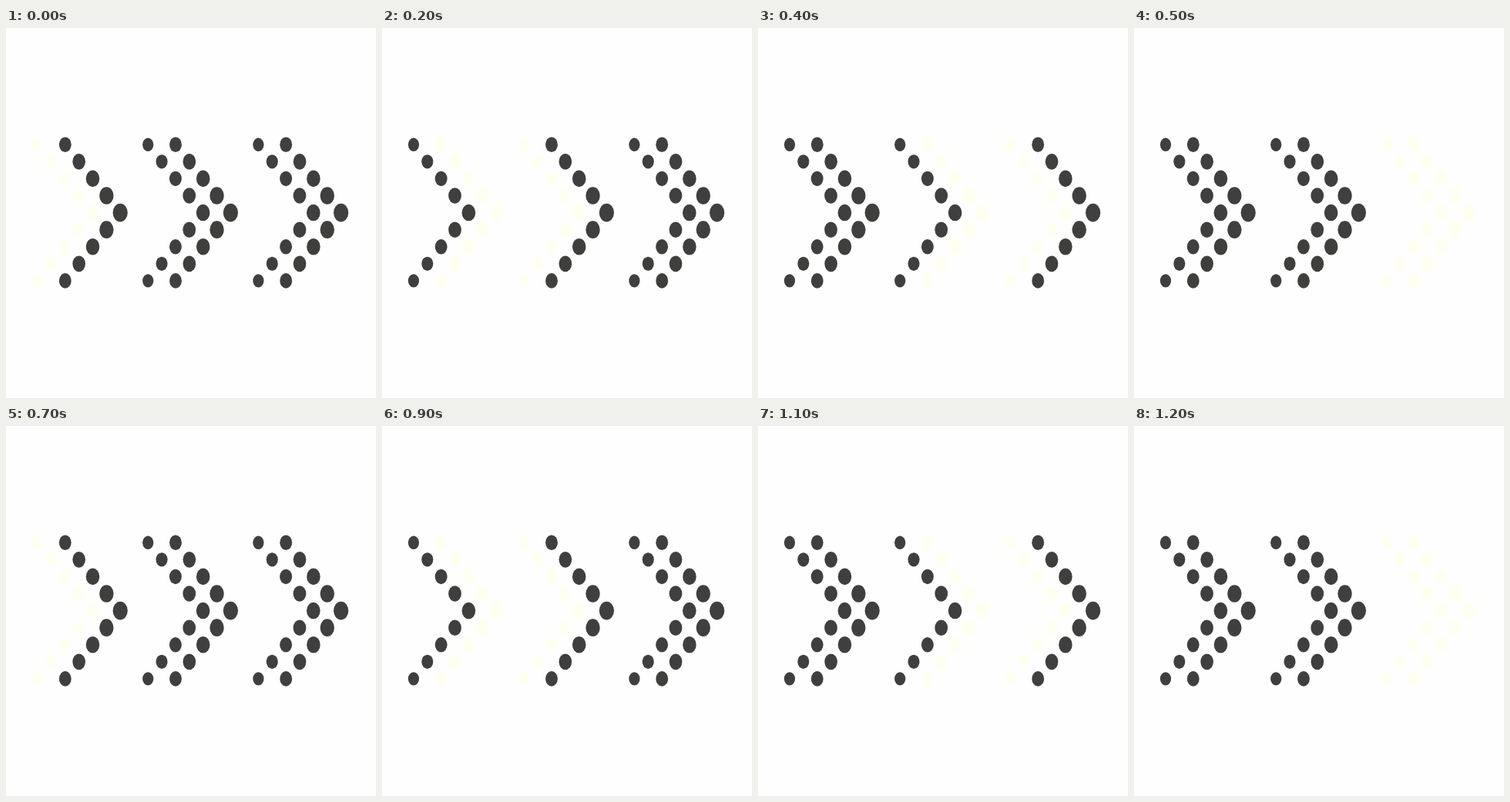
Animation, 480 px wide and 480 px high, one loop 1400 ms. Source, as an HTML page:

```html
<!DOCTYPE html>
<html lang="en">
<head>
<meta charset="utf-8">
<title>Dotted arrows</title>
<style>
  html, body { margin: 0; width: 100%; height: 100%; overflow: hidden; background: #fefefe; }
  svg { display: block; width: 100%; height: 100%; }
</style>
</head>
<body>
<svg id="stage" viewBox="0 0 480 480"></svg>
<script>
const NS = "http://www.w3.org/2000/svg";
const DARK = "#3f3f3e", PALE = "#fffff0";
const STEP = 100;
// Chevrons lit at each step; the last step is held twice as long.
const LIT = [[0], [0, 1], [1, 2], [2, 3], [3, 4], [4, 5], [4, 5]];

const stage = document.getElementById("stage");

function add(parent, name, attrs = {}) {
  const el = document.createElementNS(NS, name);
  for (const key in attrs) el.setAttribute(key, attrs[key]);
  return parent.appendChild(el);
}

// Dots grow from the ends of a chevron towards its tip.
function chevron(index) {
  const outer = index % 2;
  const left = 41 + Math.floor(index / 2) * 143.2 + outer * 35.8;
  const group = add(stage, "g");
  for (let row = -4; row <= 4; row++) {
    const k = 4 - Math.abs(row);
    add(group, "ellipse", {
      cx: left + k * 17.85,
      cy: 239.6 + row * 22.08,
      rx: (outer ? 7.9 : 7.1) + k * 0.43,
      ry: (outer ? 9.8 : 8.7) + k * 0.51
    });
  }
  return group;
}

const chevrons = Array.from({ length: 6 }, (_, i) => chevron(i));

function draw(time) {
  const lit = LIT[Math.floor(time / STEP) % LIT.length];
  chevrons.forEach((group, i) => group.setAttribute("fill", lit.includes(i) ? PALE : DARK));
}

const start = performance.now();
function tick() {
  draw(performance.now() - start);
  requestAnimationFrame(tick);
}
tick();
</script>
</body>
</html>
```
